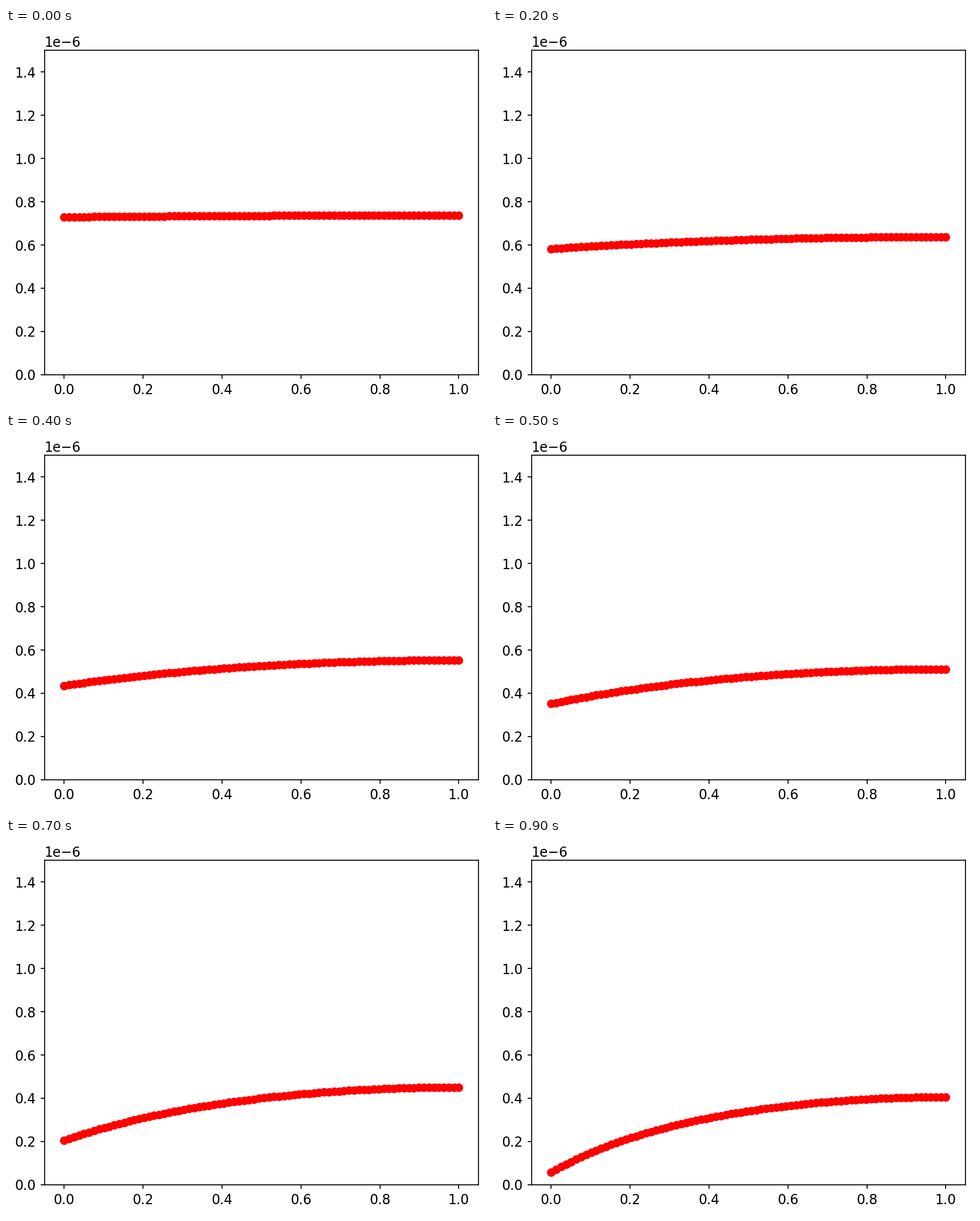
Write a matplotlib script that moves like this. It is 846x662 px and loops after 1 s.

```python
import matplotlib.pyplot as plt
import numpy as np
from matplotlib.animation import FuncAnimation

WIDTH, HEIGHT, DPI = 846, 662, 154
LEFT, RIGHT, TOP, BOTTOM = 67.6, 831.2, 39.4, 608.8
SCALE = 1e-6
FRAMES = 10

# Solver steps done by each frame: increments cycle through 4, 3, 4, 3, 4.
STEPS = np.concatenate([[0], np.cumsum([4, 3, 4, 3, 4] * 2)])[:FRAMES]

x = np.linspace(0, 1, 80)


def profile(step):
    """Concentration across the layer, drained at x = 0 and sealed at x = 1."""
    drained = 0.7292 - 0.02099 * step
    sealed = 0.7375 - 0.01535 * step + 0.0001555 * step**2
    u = 1 - x
    steep = 0.19 * (step / 32) ** 2.4
    shape = (0.9 - steep) * u**2 + 0.1 * u**4 + steep * u**6
    return SCALE * (sealed - (sealed - drained) * shape)


plt.rcParams["font.size"] = 11

# The tiny margin keeps the pixel size from rounding down.
fig = plt.figure(figsize=((WIDTH + 1e-6) / DPI, (HEIGHT + 1e-6) / DPI), dpi=DPI)
ax = fig.add_axes([LEFT / WIDTH, 1 - BOTTOM / HEIGHT,
                   (RIGHT - LEFT) / WIDTH, (BOTTOM - TOP) / HEIGHT])
ax.set_xlim(-0.05, 1.05)
ax.set_ylim(0, 1.5 * SCALE)
points, = ax.plot(x, profile(0), "ro")


def update(frame):
    points.set_ydata(profile(STEPS[frame]))
    return points,


anim = FuncAnimation(fig, update, frames=FRAMES, interval=100,
                     repeat=True, repeat_delay=0)
plt.show()
```
